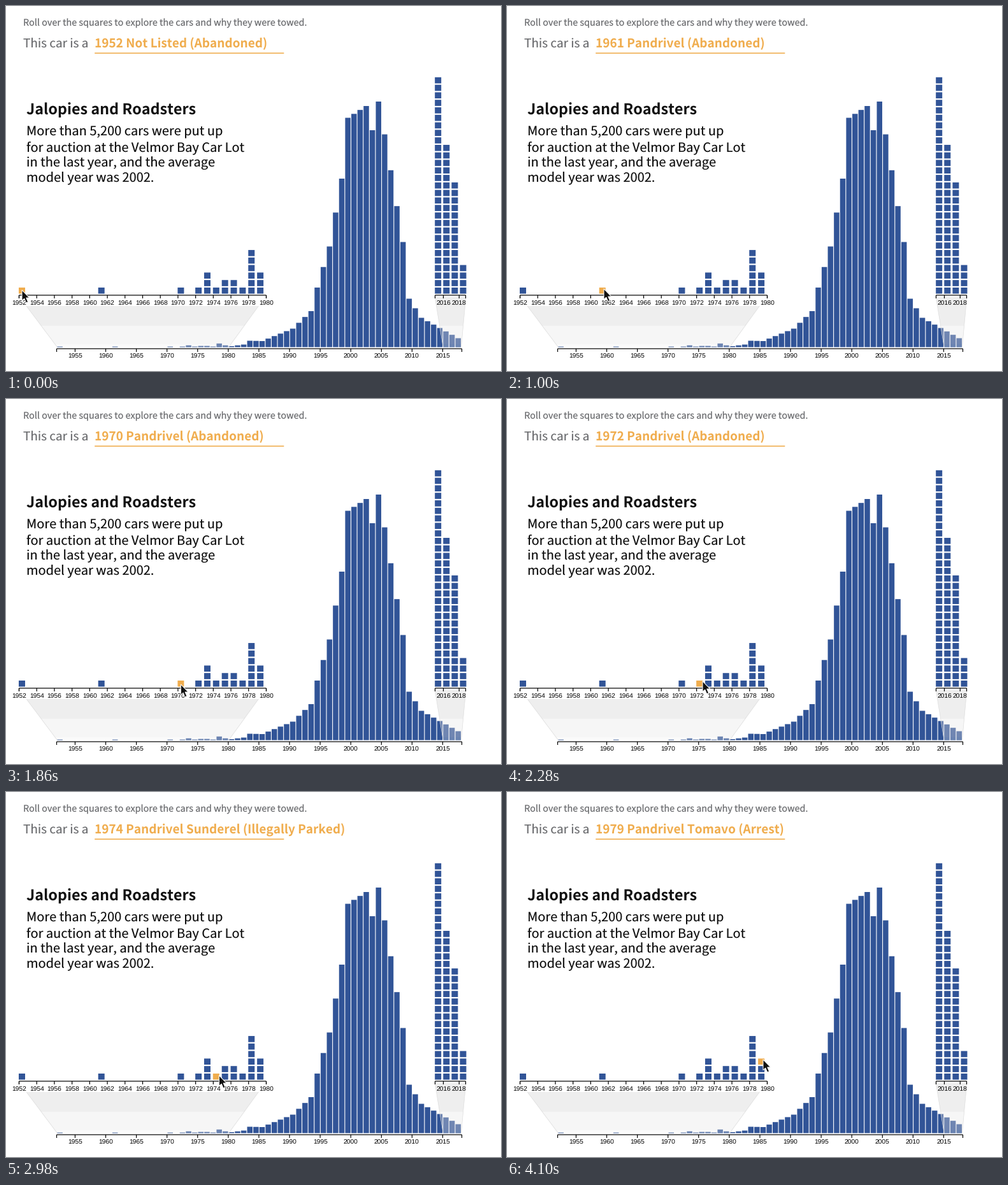
Recreate the animation shown at these times as a matplotlib script. Size 777 px wide and 573 px high, loop 10 s.

```python
import matplotlib.pyplot as plt
import numpy as np
from matplotlib.animation import FuncAnimation
from matplotlib.collections import LineCollection, PolyCollection
from matplotlib.patches import Polygon

plt.rcParams["text.hinting"] = "none"

W, H, DPI = 777, 573, 64
PX = 72 / DPI  # points per pixel
STEP, LOOP = 20, 10000

BLUE, ORANGE = "#315497", "#f0ad4e"
GRAY, INK = "#6d6e71", "#111111"
SANS, AXIS_FONT = "Noto Sans CJK JP", "Liberation Sans"

fig = plt.figure(figsize=(W / DPI, H / DPI), dpi=DPI, facecolor="white")
ax = fig.add_axes([0, 0, 1, 1])
ax.set_xlim(0, W)
ax.set_ylim(H, 0)
ax.axis("off")


def text(x, y, s, size, color, font=SANS, **kw):
    return ax.text(x, y, s, fontsize=size * PX, color=color, family=font,
                   va="baseline", zorder=4, **kw)


def boxes(rects, zorder):
    """Blue rectangles given as (x, y, width, height)."""
    polys = [[(x, y), (x + w, y), (x + w, y + h), (x, y + h)]
             for x, y, w, h in rects]
    return ax.add_collection(PolyCollection(
        polys, facecolors=BLUE, edgecolors="none", snap=False, zorder=zorder))


def axis(y, x0, x1, years, place, label_y):
    xs = [place(year) for year in years]
    lines = [[(x0, y), (x1, y)]]
    lines += [[(x, y), (x, y + 5)] for x in [x0, x1, *xs]]
    ax.add_collection(LineCollection(lines, colors="black", linewidths=1.2 * PX,
                                     snap=False, zorder=3))
    for x, year in zip(xs, years):
        text(x, label_y, str(year), 10.2, "black", AXIS_FONT, ha="center")


def funnel(top, bottom, start, y0=455, y1=535):
    """Shaded link between a zoomed axis and its part of the histogram."""
    def edge(y):
        k = (y - y0) / (y1 - y0)
        return [(a + (b - a) * k, y) for a, b in zip(top, bottom)]

    for ya, yb, color, alpha in ((start, 502, "#eeeeee", 1),
                                 (502, 531, "#e6e6e6", 0.35),
                                 (531, y1, "#f0f0f0", 0.3)):
        (a, b), (d, c) = edge(ya), edge(yb)
        ax.add_patch(Polygon([a, b, c, d], fc=color, ec="none", lw=0,
                             alpha=alpha, zorder=2))
    sides = list(zip(edge(start), edge(y1)))
    ax.add_collection(LineCollection(sides, colors="#dddddd",
                                     linewidths=0.7 * PX, zorder=2))


# Histogram of model years: counted old cars, then a curve through its bends
YEAR_W, BASE = 9.617, 535.5
OLD = {1952: 1, 1961: 1, 1970: 1} | dict(enumerate((1, 3, 1, 2, 2, 1, 6, 3), 1972))
BENDS = [(1980, 1.5), (1982, 4), (1983, 10), (1985, 9.5), (1990, 29), (1993, 56.5),
         (1994, 93.5), (1996, 158), (1998, 264.5), (1999, 360), (2002, 378.5),
         (2003, 340.5), (2004, 385.5), (2005, 334), (2008, 165), (2009, 76),
         (2011, 46), (2017, 14)]


def year_x(year):
    return 79.6 + YEAR_W * (year - 1952)


bars = {year: 0.95 * n for year, n in OLD.items()}
bars |= {year: np.interp(year, *zip(*BENDS)) for year in range(1980, 2018)}
boxes([(year_x(y) + 0.8, BASE - h, 8.5, h) for y, h in bars.items()], zorder=1)

funnel((20, 408), (80, 350), 471)
funnel((673, 722), (686, 714.5), 457)
axis(538, 79.5, 715.5, range(1955, 2016, 5), year_x, 553)


# Zoomed ends, one square per car
ROW_H, SQ_W, SQ_H = 11.79, 10, 9.6


def zoom_x(year):
    return 20 + 13.857 * (year - 1952)


def stack(x, n):
    return [(x, 442 - ROW_H * row, SQ_W, SQ_H) for row in range(n)]


cars = [(year, sq) for year, n in OLD.items() for sq in stack(zoom_x(year), n)]
late = [sq for i, n in enumerate((29, 20, 15, 4)) for sq in stack(673.2 + 13.1 * i, n)]
squares = boxes([sq for _, sq in cars] + late, zorder=3)

axis(454, 20.5, 408.5, range(1952, 1981, 2), lambda y: zoom_x(y) + 0.5, 470)
axis(454, 673.5, 721.5, (2016, 2018), lambda y: 686.5 + 12.4 * (y - 2016), 470)


# Copy
text(26.6, 32, "Roll over the squares to explore the cars and why they were towed.",
     14.35, GRAY)
text(27.3, 65, "This car is a", 19, GRAY)
text(32.5, 170, "Jalopies and Roadsters", 23.3, INK, weight="bold")
BODY = ("More than 5,200 cars were put up",
        "for auction at the Velmor Bay Car Lot",
        "in the last year, and the average",
        "model year was 2002.")
for i, line in enumerate(BODY):
    text(31.7, 203.5 + 24.4 * i, line, 20, INK)

label = text(139, 65, "", 19, ORANGE, weight="bold")
rule, = ax.plot([140, 435.5], [74, 74], color=ORANGE, lw=1.6 * PX, snap=False,
                zorder=3)

USUAL = "Pandrivel (Abandoned)"
CAR_NAMES = {
    1952: "Not Listed (Abandoned)",
    1974: "Pandrivel Sunderel (Illegally Parked)",
    1979: "Pandrivel Tomavo (Arrest)",
}


# Pointer
ARROW = 1.07 * np.array([(0, 0), (0, 15.5), (3.5, 12.4), (6.2, 18.6), (9, 17.4),
                         (6.3, 11.3), (11, 11.3)])
pointer = Polygon(ARROW, closed=True, fc="#111111", ec="white", lw=PX,
                  joinstyle="miter", zorder=6)
ax.add_patch(pointer)

# Stops of the pointer tip: time, x, y
STOPS = [(0, 25, 446), (1000, 152, 444), (1520, 248, 452),
         (2280, 307, 443), (2980, 334.5, 445), (4100, 402, 420)]
START = 1000
FADE_WAIT, FADE_TIME = 200, 430


def tip_at(t):
    if t < START:  # slow start
        t = START * (t / START) ** 3
    times, xs, ys = zip(*STOPS)
    return np.interp(t, times, xs), np.interp(t, times, ys)


def hovered(px, py):
    for i, (_, (x, y, w, h)) in enumerate(cars):
        if x <= px <= x + w and y <= py <= y + h:
            return i
    return None


def plan():
    """Pointer tip, lit square, named year and label opacity for each step."""
    states, year, left = [], 1952, 0
    for t in range(0, LOOP, STEP):
        tip = tip_at(t)
        hit = hovered(*tip)
        if hit is not None:
            year, left = cars[hit][0], t
        alpha = 1 - np.clip((t - left - FADE_WAIT) / FADE_TIME, 0, 1)
        states.append((tip, hit, year, alpha))
    return states


states = plan()


def update(i):
    tip, hit, year, alpha = states[i]
    pointer.set_xy(ARROW + tip)
    colors = [BLUE] * (len(cars) + len(late))
    if hit is not None:
        colors[hit] = ORANGE
    squares.set_facecolor(colors)
    label.set_text(f"{year} {CAR_NAMES.get(year, USUAL)}")
    label.set_alpha(alpha)
    rule.set_alpha(0.75 + 0.25 * alpha)
    return pointer, squares, label, rule


anim = FuncAnimation(fig, update, frames=LOOP // STEP, interval=STEP,
                     init_func=lambda: update(0), repeat=True, repeat_delay=0)
plt.show()
```
